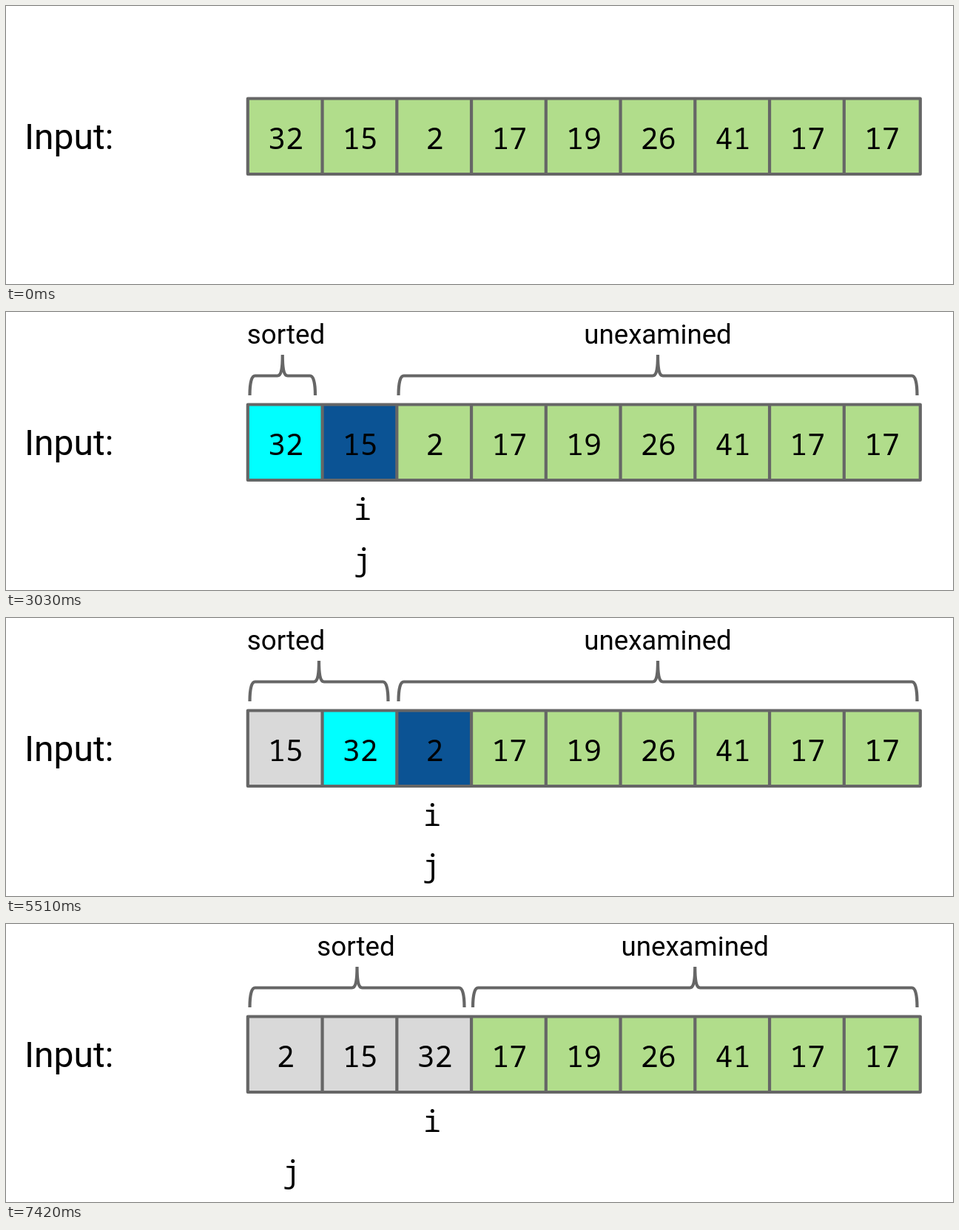
An HTML page for the animation above (8000 ms loop, 1280 by 377 pixels).

```html
<!DOCTYPE html>
<html lang="en">
<head>
<meta charset="utf-8">
<title>Insertion sort</title>
<style>
  html, body { margin: 0; width: 100%; height: 100%; overflow: hidden; background: #fff; }
  svg { display: block; width: 100%; height: 100%; }
  text { text-anchor: middle; font: 36.7px Roboto, sans-serif; }
  .mono { font: 40px "Noto Sans Mono", monospace; }
  .title { font-size: 48px; text-anchor: start; }
  path { fill: none; stroke: #666; stroke-width: 4.2; stroke-linecap: butt; }
</style>
</head>
<body>
<svg id="stage" viewBox="0 0 1280 377"></svg>
<script>
const LOOP = 8000, PITCH = 100.75, LEFT = 326.8, RIGHT = 1235.8, TOP = 125.5, BOTTOM = 228;
const FILL = { g: '#b1dd8b', s: '#d9d9d9', c: '#00ffff', b: '#0b5394' };
const TAIL = [17, 19, 26, 41, 17, 17];

// One state per step: leading values, their fills (the rest are green),
// pointer positions, brace ends and the centre of the "sorted" label.
const steps = [
  { at: 0,    head: [32, 15, 2], fills: '' },
  { at: 1060, head: [32, 15, 2], fills: 'b', i: 372, j: 372 },
  { at: 1910, head: [32, 15, 2], fills: 's', i: 372, j: 372, sortedEnd: 418, label: 378.5, restStart: 434 },
  { at: 3030, head: [32, 15, 2], fills: 'cb', i: 482, j: 482, sortedEnd: 418, label: 378.5, restStart: 530.5 },
  { at: 3940, head: [15, 32, 2], fills: 'bs', i: 482, j: 381, restStart: 530.5 },
  { at: 4800, head: [15, 32, 2], fills: 'ss', i: 482, j: 381, sortedEnd: 516.5, label: 378.5, restStart: 530.5 },
  { at: 5510, head: [15, 32, 2], fills: 'scb', i: 576, j: 575, sortedEnd: 516.5, label: 378.5, restStart: 530.5 },
  { at: 6060, head: [15, 2, 32], fills: 'cbs', i: 576, j: 481, restStart: 631 },
  { at: 6720, head: [2, 15, 32], fills: 'bss', i: 576, j: 386, restStart: 631 },
  { at: 7420, head: [2, 15, 32], fills: 'sss', i: 576, j: 386, sortedEnd: 619.5, label: 473, restStart: 631 }
];

const text = (x, y, s, cls = '') => `<text x="${x}" y="${y}" class="${cls}">${s}</text>`;
const edge = k => k === 9 ? RIGHT : LEFT + k * PITCH;

function brace(a, b) {
  const mid = (a + b) / 2;
  return `<path d="M${a} 113C${a} 98 ${a + 2} 86.5 ${a + 7} 86.5H${mid - 7}C${mid - 2} 86.5 ${mid} 78 ${mid} 58
    C${mid} 78 ${mid + 2} 86.5 ${mid + 7} 86.5H${b - 7}C${b - 2} 86.5 ${b} 98 ${b} 113"/>`;
}

function render(s) {
  let out = text(25, 194, 'Input:', 'title');
  let grid = `M${LEFT} ${TOP}H${RIGHT}V${BOTTOM}H${LEFT}Z`;
  [...s.head, ...TAIL].forEach((value, k) => {
    const x = edge(k);
    out += `<rect x="${x}" y="${TOP}" width="${edge(k + 1) - x}" height="${BOTTOM - TOP}" fill="${FILL[s.fills[k] || 'g']}"/>`;
    out += text(378 + k * PITCH, 194, value, 'mono');
    if (k) grid += `M${x} ${TOP}V${BOTTOM}`;
  });
  out += `<path d="${grid}" stroke-linejoin="round"/>`;
  if (s.i) out += text(s.i, 281.5, 'i', 'mono') + text(s.j, 350, 'j', 'mono');
  if (s.sortedEnd) out += brace(329.5, s.sortedEnd) + text(s.label, 43, 'sorted');
  if (s.restStart) out += brace(s.restStart, 1231.5) + text((s.restStart + 1231.5) / 2, 43, 'unexamined');
  return out;
}

const stage = document.getElementById('stage');
let shown;
function tick() {
  const t = performance.now() % LOOP;
  const step = steps.findLast(s => s.at <= t);
  if (step !== shown) stage.innerHTML = render(shown = step);
  requestAnimationFrame(tick);
}
tick();
</script>
</body>
</html>
```
